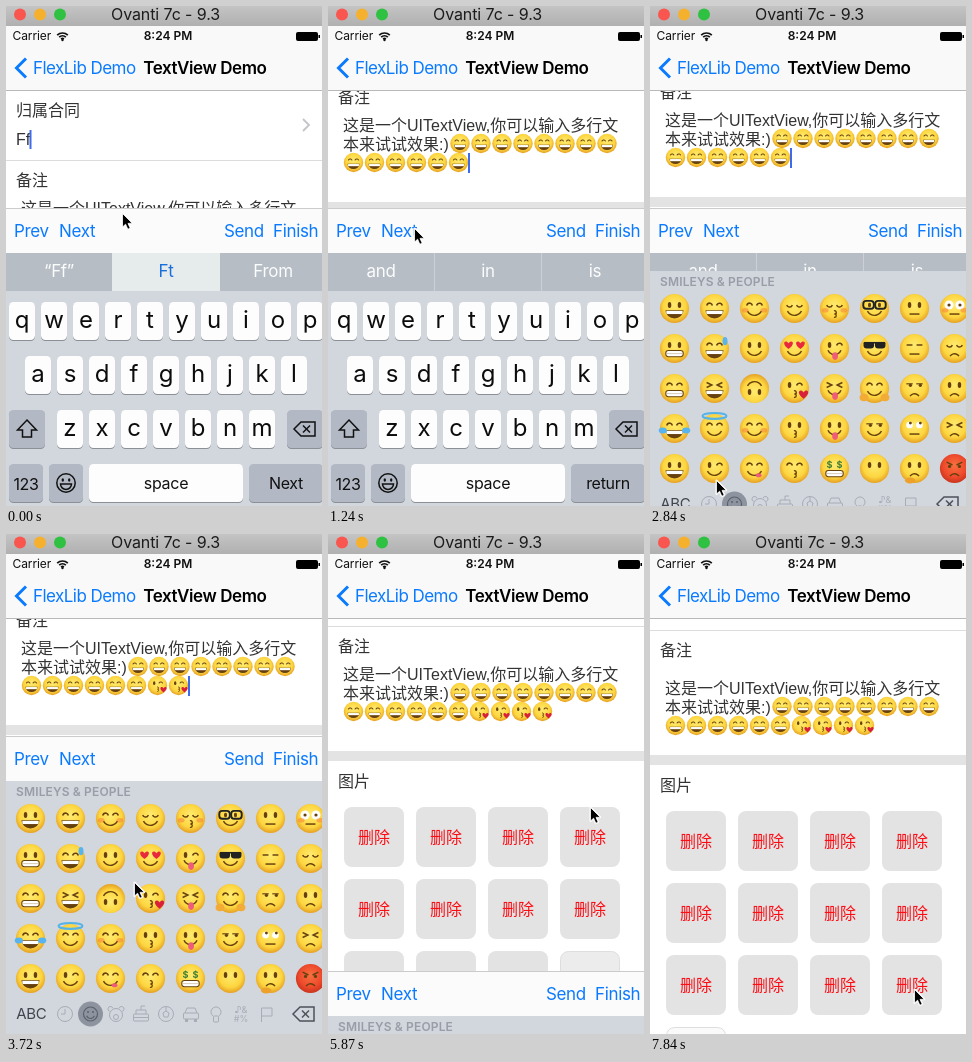
Recreate the animation shown at these times as an HTML page with a canvas. Size 316 px wide and 500 px high, loop 8000 ms.

```html
<!DOCTYPE html>
<html lang="zh">
<head>
<meta charset="utf-8">
<title>TextView Demo</title>
<style>
  html, body { margin: 0; width: 100%; height: 100%; overflow: hidden; background: #fff; }
  canvas { display: block; width: 316px; height: 500px; }
</style>
</head>
<body>
<canvas id="stage"></canvas>
<script>
const W = 316, H = 500, LOOP = 8000, STEP = 177.9;
const canvas = document.getElementById('stage');
const c = canvas.getContext('2d');
const dpr = window.devicePixelRatio || 1;
canvas.width = W * dpr;
canvas.height = H * dpr;

const UI = 'Inter, "Noto Sans CJK SC", sans-serif';
const BODY = '"Liberation Sans", "Noto Sans CJK SC", "Noto Sans CJK", sans-serif';
const BLUE = '#0a7aff', INK = '#333', KB = '#d2d6dd', BAR = '#b6bdc5';
const TAU = Math.PI * 2;

const POINTER = [
  [0, 116, 207], [2, 106, 213], [4, 88, 222], [5, 86, 222], [8, 86, 222], [9, 83, 275],
  [10, 76, 385], [11, 70, 450], [12, 67, 467], [13, 66, 474], [16, 66, 474],
  [18, 110, 385], [19, 128, 348], [24, 128, 348], [26, 185, 305], [28, 268, 235],
  [29, 278, 225], [32, 278, 225], [34, 245, 320], [36, 192, 430], [37, 184, 445],
  [38, 182, 448], [39, 192, 450], [40, 216, 454], [41, 239, 457], [42, 239, 457], [44, 264, 455]
];
const SCROLL = [[5, 0], [6, 40], [7, 83], [8, 88], [31, 88], [32, 80], [33, 62], [34, 58]];
const KB_DROP = [[31, 0], [32, 70], [33, 235], [34, 300]];
const EMOJI_RISE = [[16, 18], [17, 0]];

// Each face: eyes, mouth, optional extra
const FACES = [
  'oD ^D ^)b u) u*b n) o- O-b',
  'oE ^Dt o) h) wP g) -- u(',
  '^E xD o)! w*H xP ^)a s( o(',
  '^DT ^)l ^)b o* oP s) r- x(',
  'oD w) ^)p ^* $E o_ o(q v(R'
].map(row => row.split(' '));

function track(keys, k) {
  const i = keys.findIndex(p => p[0] > k);
  if (i < 0) return keys[keys.length - 1].slice(1);
  if (i === 0) return keys[0].slice(1);
  const a = keys[i - 1], b = keys[i], u = (k - a[0]) / (b[0] - a[0]);
  return a.slice(1).map((v, n) => v + (b[n + 1] - v) * u);
}

// y is the middle of the capitals
function text(s, x, y, size, color, { weight = 400, align = 'left', ls = 0, font = UI } = {}) {
  c.font = `${weight} ${size}px ${font}`;
  c.letterSpacing = ls + 'px';
  c.textAlign = align;
  c.fillStyle = color;
  c.fillText(s, x, y + size * 0.36);
}

function rect(x, y, w, h, color) {
  c.fillStyle = color;
  c.fillRect(x, y, w, h);
}

function round(x, y, w, h, r, fill, stroke) {
  c.beginPath();
  c.roundRect(x, y, w, h, r);
  if (fill) { c.fillStyle = fill; c.fill(); }
  if (stroke) { c.strokeStyle = stroke; c.lineWidth = 1; c.stroke(); }
}

function disc(x, y, rx, color, ry = rx) {
  c.beginPath();
  c.ellipse(x, y, rx, ry, 0, 0, TAU);
  c.fillStyle = color;
  c.fill();
}

function line(points, color, width, close, fill) {
  c.beginPath();
  points.forEach(([x, y]) => c.lineTo(x, y));
  if (close) c.closePath();
  if (fill) { c.fillStyle = fill; c.fill(); }
  c.strokeStyle = color;
  c.lineWidth = width;
  c.stroke();
}

function arc(x, y, r, from, to, color, width) {
  c.beginPath();
  c.arc(x, y, r, from * Math.PI, to * Math.PI);
  c.strokeStyle = color;
  c.lineWidth = width;
  c.stroke();
}

function heart(x, y, r, color) {
  c.beginPath();
  c.moveTo(x, y + r);
  c.bezierCurveTo(x - r * 2, y - r * 0.4, x - r * 0.7, y - r * 1.5, x, y - r * 0.4);
  c.bezierCurveTo(x + r * 0.7, y - r * 1.5, x + r * 2, y - r * 0.4, x, y + r);
  c.fillStyle = color;
  c.fill();
}

const BROWN = '#66400f', PINK = '#ef5d78';

function eye(kind, s) {
  const x = s * 0.34, y = -0.24;
  switch (kind) {
    case 'o': disc(x, y, 0.12, BROWN, 0.2); break;
    case '^': arc(x, y + 0.08, 0.2, 1.08, 1.92, BROWN, 0.11); break;
    case 'u': arc(x, y - 0.06, 0.2, 0.1, 0.9, BROWN, 0.1); break;
    case '-': line([[x - 0.2, y], [x + 0.2, y]], BROWN, 0.1); break;
    case 'w': eye(s < 0 ? 'o' : '^', s); break;
    case 'x': line([[x + s * 0.2, y - 0.17], [x - s * 0.16, y], [x + s * 0.2, y + 0.17]], BROWN, 0.1); break;
    case 'h': heart(x * 1.2, y, 0.28, '#e8283c'); break;
    case 'g': round(x * 1.15 - 0.36, y - 0.2, 0.72, 0.44, [0.08, 0.08, 0.22, 0.22], '#222'); break;
    case 'n':
      disc(x, y, 0.11, BROWN, 0.16);
      c.beginPath();
      c.roundRect(x * 1.2 - 0.36, y - 0.28, 0.72, 0.54, 0.2);
      c.strokeStyle = '#222';
      c.lineWidth = 0.13;
      c.stroke();
      break;
    case 'O': disc(x * 1.1, y, 0.31, '#fff'); disc(x * 1.1, y, 0.11, BROWN); break;
    case 'r': disc(x, y, 0.23, '#fff'); disc(x + 0.06, y - 0.13, 0.1, BROWN); break;
    case 's':
      disc(x + 0.06, y + 0.02, 0.11, BROWN);
      line([[x - 0.22, y - 0.08], [x + 0.22, y - 0.08]], BROWN, 0.08);
      break;
    case 'v':
      disc(x, y + 0.1, 0.11, BROWN);
      line([[x + s * 0.2, y - 0.2], [x - s * 0.2, y]], BROWN, 0.1);
      break;
    case '$': text('$', x, y, 0.62, '#3e7d33', { weight: 700, align: 'center' }); break;
  }
}

function grin() {
  c.save();
  c.beginPath();
  c.ellipse(0, 0.12, 0.62, 0.56, 0, 0, Math.PI);
  c.closePath();
  c.clip();
  rect(-1, 0, 2, 1, BROWN);
  rect(-0.56, 0.16, 1.12, 0.22, '#fff');
  c.restore();
}

function mouth(kind) {
  switch (kind) {
    case 'D': grin(); break;
    case 'P':
      arc(0, -0.06, 0.48, 0.12, 0.88, BROWN, 0.1);
      disc(0.04, 0.52, 0.2, PINK, 0.26);
      break;
    case 'E':
      round(-0.6, 0.14, 1.2, 0.42, 0.18, '#fff');
      c.strokeStyle = BROWN;
      c.lineWidth = 0.07;
      c.stroke();
      line([[-0.58, 0.35], [0.58, 0.35]], '#b9a27c', 0.04);
      break;
    case ')': arc(0, -0.08, 0.55, 0.16, 0.84, BROWN, 0.1); break;
    case '(': arc(0, 0.72, 0.36, 1.18, 1.82, BROWN, 0.1); break;
    case '-': line([[-0.34, 0.38], [0.34, 0.38]], BROWN, 0.1); break;
    case '*':
      arc(0, 0.27, 0.12, 1.4, 2.5, BROWN, 0.09);
      arc(0, 0.49, 0.12, 1.5, 2.6, BROWN, 0.09);
      break;
  }
}

function extra(kind) {
  switch (kind) {
    case 'b': for (const s of [-1, 1]) disc(s * 0.64, 0.12, 0.23, 'rgba(245,110,60,.45)', 0.16); break;
    case 't': disc(0.72, -0.5, 0.17, '#58b4ee', 0.28); break;
    case 'T': for (const s of [-1, 1]) disc(s * 0.8, 0.14, 0.28, '#58b4ee', 0.2); break;
    case 'H': heart(0.62, 0.4, 0.3, '#d8203a'); break;
    case 'a': for (const s of [-1, 1]) disc(s * 0.72, 0.62, 0.3, '#f2ab35', 0.26); break;
    case 'q': disc(-0.3, 0.82, 0.36, '#eda02a', 0.2); break;
    case 'p': disc(0.28, 0.46, 0.2, PINK, 0.14); break;
    case 'l':
      c.beginPath();
      c.ellipse(0, -0.86, 0.82, 0.2, 0, 0, TAU);
      c.strokeStyle = '#55b3e8';
      c.lineWidth = 0.14;
      c.stroke();
      break;
  }
}

function face(x, y, r, [eyes, lips, more]) {
  c.save();
  c.translate(x, y);
  c.scale(r, r);
  if (more === '!') c.rotate(Math.PI);
  const tones = more === 'R'
    ? ['#f9703f', '#ee4a2c', '#c9341d']
    : ['#ffeb70', '#fdd640', '#e5a024'];
  const g = c.createRadialGradient(0, -0.25, 0, 0, -0.12, 1.12);
  [0, 0.68, 1].forEach((at, i) => g.addColorStop(at, tones[i]));
  disc(0, 0, 1, g);
  eye(eyes, -1);
  eye(eyes, 1);
  if (eyes === 'g') line([[-0.7, -0.4], [0.7, -0.4]], '#222', 0.1);
  mouth(lips);
  extra(more);
  c.restore();
}

function titleBar() {
  const g = c.createLinearGradient(0, 0, 0, 20);
  g.addColorStop(0, '#c4c4c4');
  g.addColorStop(1, '#b0b0b0');
  rect(0, 0, W, 20, g);
  ['#f9564f', '#f5b02e', '#2fc142'].forEach((col, i) => disc(14 + 20 * i, 8.5, 6, col));
  text('Ovanti 7c - 9.3', 159.5, 8.3, 16, '#1c1c1c', { align: 'center', ls: -0.1 });
}

function navBar() {
  rect(0, 20, W, 64, '#f9f9f9');
  rect(0, 84, W, 1, '#b9b9bb');
  text('Carrier', 6.5, 30, 12, '#111', { ls: -0.1 });
  [8, 5.2, 2.4].forEach(r => arc(56.5, 34.5, r - 0.5, 1.25, 1.75, '#111', 1.7));
  disc(56.5, 34, 1.2, '#111');
  text('8:24 PM', 162, 30, 12, '#111', { weight: 600, align: 'center' });
  round(290, 26, 22, 9, 2, '#000');
  rect(312.5, 29, 1.5, 3, '#000');
  line([[20, 52.5], [10.5, 62], [20, 71.5]], BLUE, 3);
  text('FlexLib Demo', 27, 62, 17, BLUE, { ls: -0.55 });
  text('TextView Demo', 137.3, 62, 17, '#000', { weight: 600, ls: -0.41 });
}

function tile(i, top, last) {
  const x = 16 + (i % 4) * 72, y = top + Math.floor(i / 4) * 72;
  if (!last) {
    round(x, y, 60, 60, 8, '#e3e3e3');
    text('删除', x + 30, y + 30, 16, '#fb0d14', { align: 'center', font: BODY });
    return;
  }
  round(x + 0.5, y + 0.5, 59, 59, 8, i > 11 ? '#fafafa' : '#ececec', '#dedede');
  line([[x + 25, y + 31.5], [x + 35, y + 31.5]], '#8c8c8c', 1.3);
  line([[x + 30, y + 26.5], [x + 30, y + 36.5]], '#8c8c8c', 1.3);
}

function page(k, kisses, caret) {
  const top = -track(SCROLL, k)[0];
  const body = { font: BODY };
  c.save();
  c.translate(0, top);
  text('归属合同', 10, 104, 16, INK, body);
  text('Ff', 10, 133, 16, INK, body);
  line([[297, 113], [303, 119], [297, 125]], '#c4c4c8', 1.8);
  rect(0, 154, W, 1, '#dcdcdc');
  text('备注', 10, 174, 16, INK, body);

  const y = 202 + (k >= 37 ? 10 : 0);
  text('这是一个UITextView,你可以输入多行文', 15, y + 0.5, 16, INK, body);
  text('本来试试效果:)', 15, y + 19.5, 16, INK, body);
  for (let i = 0; i < 8; i++) face(132 + 21 * i, y + 18.5, 9.7, '^D');
  for (let i = 0; i < 6 + kisses; i++) face(25.5 + 21 * i, y + 37.5, 9.7, i < 6 ? '^D' : 'w*H');
  if (caret) {
    if (k < 6) rect(23.5, 124, 2, 19, '#3f6bea');
    else rect(140 + 21 * kisses, y + 28, 2, 20, '#3f6bea');
  }

  rect(0, 279, W, 10, '#e3e3e3');
  text('图片', 10, 309, 16, INK, body);
  const count = k >= 42 ? 13 : 12;
  for (let i = 0; i < count; i++) tile(i, 335, i === count - 1);
  c.restore();
}

function toolbar(pressed) {
  rect(0, 202, W, 45, '#fbfbfc');
  rect(0, 202, W, 1, '#cbcbcd');
  [['Prev', 8], ['Next', 53], ['Send', 218], ['Finish', 267]].forEach(([s, x]) => {
    c.globalAlpha = s === pressed ? 0.2 : 1;
    text(s, x, 225, 17, BLUE, { ls: -0.35 });
    c.globalAlpha = 1;
  });
}

function suggestions(words, picked) {
  rect(0, 247, W, 38, BAR);
  if (picked) rect(106, 247, 108, 38, '#e6ebec');
  else [106, 213].forEach(x => rect(x, 247, 1, 38, '#ccd1d7'));
  words.forEach((word, i) => {
    const color = picked && i === 1 ? '#1a6fdc' : '#fbfcfd';
    text(word, 53 + 107 * i, 265, 17, color, { align: 'center', ls: -0.3 });
  });
}

function key(x, y, w, fill = '#fdfdfe') {
  round(x, y + 1, w, 38, 4.5, '#8b8f96');
  round(x, y, w, 38, 4.5, fill);
}

function backspace(x, y, color) {
  line([[x - 11, y], [x - 4, y - 7], [x + 10, y - 7], [x + 10, y + 7], [x - 4, y + 7]], color, 1.5, true);
  line([[x - 2, y - 3.5], [x + 5, y + 3.5]], color, 1.5);
  line([[x - 2, y + 3.5], [x + 5, y - 3.5]], color, 1.5);
}

function letters(action) {
  const gray = '#b2b9c4', mid = { align: 'center' };
  rect(0, 285, W, 215, KB);
  [['qwertyuiop', 3, 296], ['asdfghjkl', 19, 350], ['zxcvbnm', 51, 404]].forEach(([row, x0, y]) =>
    [...row].forEach((ch, i) => {
      key(x0 + 32 * i, y, 26);
      text(ch, x0 + 13 + 32 * i, y + 17, 24, '#0c0c0c', mid);
    }));
  key(3, 404, 36, gray);
  line([[21, 414], [30.5, 424], [25.5, 424], [25.5, 431], [16.5, 431], [16.5, 424], [11.5, 424]], '#111', 1.5, true);
  key(281, 404, 36, gray);
  backspace(299, 423, '#111');
  key(3, 458, 34, gray);
  text('123', 20, 478, 16, '#111', { align: 'center', ls: -0.3 });
  key(43, 458, 34, gray);
  arc(60, 477, 9.2, 0, 2, '#111', 1.5);
  disc(56.8, 474, 1.2, '#111', 1.8);
  disc(63.2, 474, 1.2, '#111', 1.8);
  c.beginPath();
  c.arc(60, 478, 5.5, 0, Math.PI);
  c.closePath();
  c.stroke();
  key(83, 458, 154);
  text('space', 160, 477, 16, '#111', { align: 'center', ls: -0.3 });
  key(243, 458, 74, gray);
  text(action, 280, 477, 16, '#111', { align: 'center', ls: -0.3 });
}

function categoryIcons() {
  const col = '#a7acb6', y = 480;
  arc(59, y, 7.5, 0, 2, col, 1);
  line([[59, y - 5], [59, y], [55, y]], col, 1);

  disc(84.5, y, 12.5, '#8e949f');
  arc(84.5, y, 7, 0, 2, '#5b616b', 1.2);
  disc(82, y - 2, 1, '#5b616b');
  disc(87, y - 2, 1, '#5b616b');
  arc(84.5, y + 0.5, 4, 0.1, 0.9, '#5b616b', 1.2);

  arc(110, y + 1, 6.5, 0, 2, col, 1);
  arc(104.5, y - 5, 2.5, 0.6, 1.9, col, 1);
  arc(115.5, y - 5, 2.5, 1.1, 2.4, col, 1);
  arc(110, y + 3, 2.5, 0, 2, col, 1);

  round(127.5, y, 15, 7, 1, null, col);
  line([[130, y], [130, y - 4], [140, y - 4], [140, y]], col, 1);
  line([[135, y - 4], [135, y - 8], [139, y - 8]], col, 1);
  line([[128, y + 3.5], [142, y + 3.5]], col, 1);

  arc(160, y, 7.5, 0, 2, col, 1);
  line([[160, y - 3], [163, y - 1], [162, y + 3], [158, y + 3], [157, y - 1]], col, 1, true);
  line([[160, y - 7], [160, y - 3]], col, 1);

  round(177.5, y - 1, 15, 6, 1, null, col);
  line([[179, y - 1], [181, y - 6], [189, y - 6], [191, y - 1]], col, 1);
  rect(179, y + 5, 3, 3, col);
  rect(188, y + 5, 3, 3, col);

  arc(210, y - 2, 5, 0.7, 2.3, col, 1);
  round(207.5, y + 2, 5, 6, 1, null, col);

  text('♪&', 235, y - 4, 9, col, { align: 'center' });
  text('#%', 235, y + 5, 9, col, { align: 'center' });

  line([[255.5, y + 8], [255.5, y - 6], [266, y - 6], [266, y + 2], [255.5, y + 2]], col, 1);
}

function emojiBoard(dy) {
  c.save();
  c.translate(0, dy);
  rect(0, 247, W, 260, KB);
  text('SMILEYS & PEOPLE', 10, 258, 12, '#989da7', { weight: 600, ls: 0.15 });
  FACES.forEach((row, j) => row.forEach((kind, i) => face(24.5 + 40 * i, 284.5 + 40 * j, 14.6, kind)));
  text('ABC', 10.3, 480, 15, '#41464e', { ls: -0.3 });
  categoryIcons();
  backspace(298, 480, '#4c525b');
  c.restore();
}

function keyboard(k) {
  const drop = track(KB_DROP, k)[0];
  if (drop >= 300) return;
  c.save();
  c.translate(0, drop);
  toolbar(k === 5 ? 'Next' : k === 31 ? 'Finish' : '');
  if (k < 6) suggestions(['“Ff”', 'Ft', 'From'], true);
  else suggestions(['and', 'in', 'is'], false);
  if (k < 16) letters(k < 6 ? 'Next' : 'return');
  else emojiBoard(track(EMOJI_RISE, k)[0]);
  c.restore();
}

function pointer(x, y) {
  c.save();
  c.translate(x, y);
  c.lineJoin = 'round';
  const shape = [[0.5, 0.5], [0.5, 14], [3.6, 11.2], [5.8, 16.2], [8.2, 15.2], [6, 10.4], [10.2, 10.2]];
  line(shape, '#fff', 2, true);
  line(shape, '#fff', 0.8, true, '#000');
  c.restore();
}

function caretOn(k) {
  const off = [2, 3, 10, 13, 27, 28];
  return k < 32 && !off.includes(k);
}

function draw(k) {
  c.setTransform(dpr, 0, 0, dpr, 0, 0);
  rect(0, 0, W, H, '#fff');
  const kisses = Math.max(0, Math.min(4, k - 19));
  page(k, kisses, caretOn(k));
  keyboard(k);
  navBar();
  titleBar();
  pointer(...track(POINTER, k).map(Math.round));
}

const start = performance.now();
function tick() {
  const t = (performance.now() - start) % LOOP;
  draw(Math.min(44, Math.floor((t + 16) / STEP)));
  requestAnimationFrame(tick);
}
tick();
</script>
</body>
</html>
```
